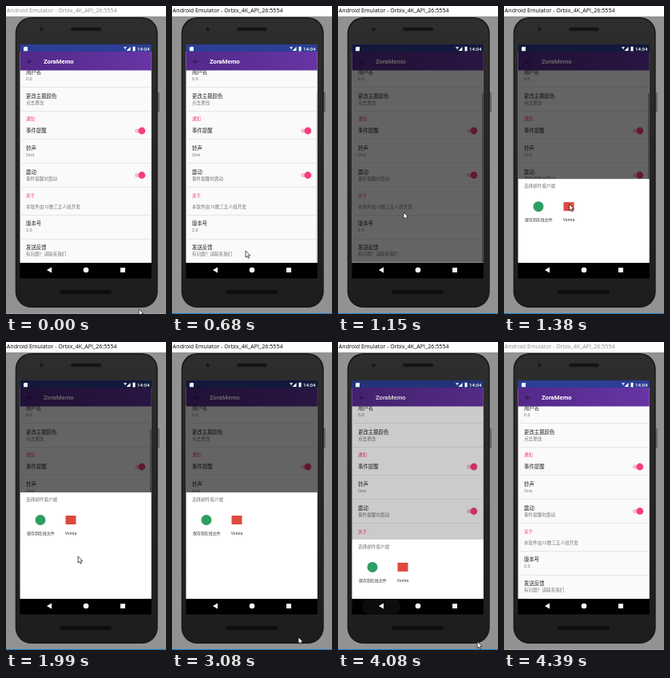
Recreate the animation shown at these times as an HTML page with a canvas. Size 200 px wide and 385 px high, loop 4460 ms.

```html
<!DOCTYPE html>
<html lang="zh-CN">
<head>
<meta charset="utf-8">
<title>Settings demo</title>
<style>
html, body { margin: 0; width: 100%; height: 100%; overflow: hidden; background: #fff; }
canvas { display: block; width: 200px; height: 385px; }
</style>
</head>
<body>
<canvas id="stage"></canvas>
<script>
const W = 200, H = 385, LOOP = 4460, STEP = 77.1;
const LEFT = 17.5, TOP = 48, WIDE = 164.3, BASE = 321;
const SANS = "Roboto, 'Noto Sans CJK SC', 'Noto Sans CJK', sans-serif";
const PINK = '#f73f78';
const canvas = document.getElementById('stage');
const ratio = window.devicePixelRatio || 1;
canvas.width = W * ratio;
canvas.height = H * ratio;
const g = canvas.getContext('2d');
g.scale(ratio, ratio);

// Pointer path: time, x, y
const path = [
  [0, 166, 379], [70, 162, 374], [530, 92, 308], [700, 92, 306], [995, 85, 283],
  [1149, 82, 258], [1600, 81, 238], [1760, 82, 240], [1997, 90, 268], [2200, 90, 268],
  [2770, 126, 350], [2920, 144, 362], [3077, 158, 369], [3390, 62, 333],
  [3690, 61, 333], [3925, 144, 363], [4160, 190, 381]
];

const clamp = v => Math.max(0, Math.min(1, v));
const span = (t, a, b) => clamp((t - a) / (b - a));

function box(x, y, w, h, color) {
  g.fillStyle = color;
  g.fillRect(x, y, w, h);
}

function pill(x, y, w, h, r, color) {
  g.fillStyle = color;
  g.beginPath();
  g.roundRect(x, y, w, h, r);
  g.fill();
}

function dot(x, y, r, color) {
  g.fillStyle = color;
  g.beginPath();
  g.arc(x, y, r, 0, Math.PI * 2);
  g.fill();
}

function shape(points, color) {
  g.fillStyle = color;
  g.beginPath();
  points.forEach(([x, y]) => g.lineTo(x, y));
  g.closePath();
  g.fill();
}

function fade(x0, y0, x1, y1, from, to) {
  const fill = g.createLinearGradient(x0, y0, x1, y1);
  fill.addColorStop(0, from);
  fill.addColorStop(1, to);
  return fill;
}

// Text is placed by its vertical centre
function label(s, x, y, size, color, { weight = 400, align = 'left', font = SANS } = {}) {
  g.font = `${weight} ${size}px ${font}`;
  g.fillStyle = color;
  g.textAlign = align;
  g.textBaseline = 'alphabetic';
  g.fillText(s, x, y + size * 0.37);
}

function drawWindow(active) {
  box(0, 0, W, H, '#fff');
  label('Android Emulator - Orbix_4K_API_26:5554', 0.8, 5.5, 7.1, active ? '#000' : '#8a8a8a',
    { font: "'Open Sans', 'Noto Sans', sans-serif" });
  box(0, 13, W, H - 13, '#929292');
  box(0, 384, W, 1, active ? '#1a7fd0' : '#a6a6a6');
}

function drawPhone() {
  pill(188, 108, 4, 25, 1, '#686868');
  pill(11.7, 14, 178, 363, 20, '#191919');
  pill(13.2, 15.5, 175, 360, 19, fade(0, 14, 0, 377, '#2f2e2e', '#1d1d1d'));
  dot(44.5, 29, 2.3, '#181818');
  pill(81, 26.8, 38, 4.4, 2.2, '#141414');
  pill(67, 355.3, 65, 4.6, 2.3, '#0d0d0d');
}

function drawToggle(y) {
  pill(161, y - 2.6, 11, 5.2, 2.6, '#fbbccd');
  dot(169.8, y, 4.4, PINK);
}

function drawSettings() {
  box(LEFT, 57, WIDE, BASE - 57, '#fafafa');
  for (const y of [101, 131, 166, 196, 226, 261, 291]) box(LEFT, y, WIDE, 0.7, '#dedede');

  const rows = [
    [83, '用户名', '0.0'], [113, '更改主题颜色', '点击更改'], [156, '事件提醒', ''],
    [178, '铃声', 'Orni'], [208, '震动', '事件提醒时震动'],
    [272, '版本号', '2.0'], [302, '发送反馈', '有问题？请联系我们']
  ];
  for (const [y, name, note] of rows) {
    label(name, 25, y, 6.4, '#222');
    label(note, 25, y + 8.4, 5.6, '#777');
  }
  label('通知', 25, 141, 5.6, PINK);
  label('关于', 25, 237, 5.6, PINK);
  label('本软件由12数工五人组开发', 25, 251, 5.6, '#777');
  drawToggle(156);
  drawToggle(211.5);
}

function drawBars() {
  box(LEFT, 57, WIDE, 23.5, fade(LEFT, 0, LEFT + WIDE, 0, '#532989', '#6735a4'));
  box(LEFT, TOP, WIDE, 9, '#2b3f96');

  g.strokeStyle = '#28133f';
  g.lineWidth = 0.9;
  g.beginPath();
  g.moveTo(33, 69.5);
  g.lineTo(27, 69.5);
  g.moveTo(30, 66.5);
  g.lineTo(27, 69.5);
  g.lineTo(30, 72.5);
  g.stroke();
  label('ZoraMemo', 47, 69.5, 7.7, '#fff', { weight: 700 });
}

// Status icons stay bright above the dimmed screen
function drawStatus() {
  shape([[23, 51], [27, 51], [27, 56.3], [22, 56.3], [22, 52]], '#fff');
  shape([[147, 51], [151, 51], [149, 54.5]], '#d5daec');
  shape([[155.5, 51], [155.5, 56], [150.5, 56]], '#fff');
  box(158.5, 50.8, 3, 5.6, '#fff');
  label('14:04', 164, 53.4, 6.1, '#fff', { weight: 500 });
}

function drawSheet(y) {
  g.save();
  g.beginPath();
  g.rect(LEFT, TOP, WIDE, BASE - TOP);
  g.clip();
  g.translate(0, y);
  box(LEFT, 0, WIDE, 140, '#fff');
  label('选择邮件客户端', 25, 9, 5.6, '#777');
  dot(43, 34.5, 6.5, '#2f9e63');
  box(74.5, 29, 13, 11, '#dc4a3d');
  label('保存到在线文件', 43.3, 51.3, 4.95, '#333', { align: 'center' });
  label('Vomra', 81, 51.3, 4.95, '#333', { align: 'center' });
  g.restore();
}

function drawNav(pressed) {
  box(LEFT, BASE, WIDE, 19.5, '#000');
  if (pressed) pill(30, BASE, 48, 19, 9.5, `rgba(255,255,255,${0.13 * pressed})`);
  shape([[51, 330], [57, 326.6], [57, 333.4]], '#fff');
  dot(100, 330, 3.3, '#fff');
  box(143, 327.2, 6, 5.8, '#fff');
}

function drawPointer(t) {
  if (t > 4225) return;
  let i = 1;
  while (i < path.length - 1 && t > path[i][0]) i++;
  const [ta, xa, ya] = path[i - 1], [tb, xb, yb] = path[i];
  const p = span(t, ta, tb);
  g.save();
  g.translate(xa + (xb - xa) * p, ya + (yb - ya) * p);
  shape([[0, 0], [0, 8], [1.9, 6.3], [3.2, 9.2], [4.6, 8.6], [3.3, 5.8], [5.8, 5.7]], '#fff');
  g.strokeStyle = '#111';
  g.lineWidth = 0.7;
  g.stroke();
  g.restore();
}

function draw(time) {
  const k = Math.floor((time - 70) / STEP + 0.1);
  const t = k < 0 ? 0 : 70 + k * STEP;

  const leave = span(t, 3840, 4160);
  const dim = 0.6 * span(t, 855, 1149) * (1 - span(t, 3900, 4160));
  const rise = 1 - (1 - span(t, 1149, 1650)) ** 2.5;
  const sheetY = BASE - 133 * rise + 133 * leave ** 2.8;

  drawWindow(t > 450 && t < 4350);
  drawPhone();
  drawSettings();
  drawBars();
  const bar = span(t, 660, 760) * (1 - span(t, 2260, 2700));
  if (bar) box(180, 109, 1.8, BASE - 109, `rgba(90,90,90,${0.55 * bar})`);
  if (dim) box(LEFT, TOP, WIDE, BASE - TOP, `rgba(0,0,0,${dim})`);
  drawStatus();
  if (rise && leave < 1) drawSheet(sheetY);
  drawNav(span(t, 3640, 3760) * (1 - span(t, 3940, 4160)));
  drawPointer(t);
}

const start = performance.now();
function tick() {
  draw((performance.now() - start) % LOOP);
  requestAnimationFrame(tick);
}
tick();
</script>
</body>
</html>
```
